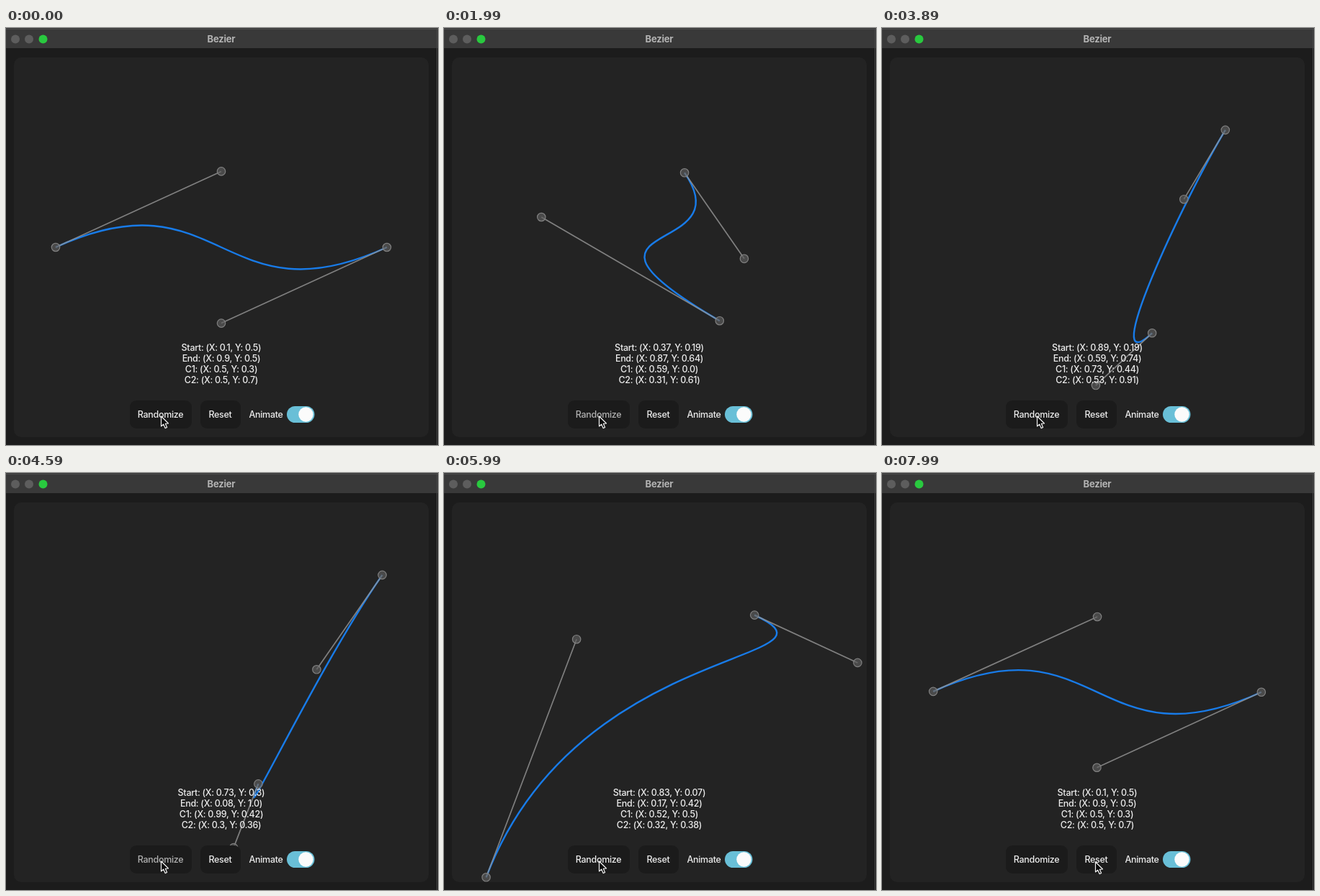
These frames come from a looping animation (600 px wide and 580 px high, 8090 ms). An HTML page with a canvas:

```html
<!DOCTYPE html>
<html lang="en">
<head>
<meta charset="utf-8">
<title>Bezier</title>
<style>
html, body { margin: 0; width: 100%; height: 100%; overflow: hidden; background: #1c1c1c; }
canvas { display: block; width: 600px; height: 580px; }
</style>
</head>
<body>
<canvas id="stage" width="600" height="580"></canvas>
<script>
const ctx = document.getElementById('stage').getContext('2d');
const LOOP = 8090, STEP = 100, MOVE = 800;
const FONT = 'Inter, "Open Sans", sans-serif';
const panel = { x: 11.5, y: 41, w: 575, h: 528 };

// Each pose: start, end, c1, c2 as x, y fractions of the panel.
const home = [0.1, 0.5, 0.9, 0.5, 0.5, 0.3, 0.5, 0.7];
const poses = [
  { at: -MOVE, p: home },
  { at: 650, p: [0.5625, 0.3045, 0.644, 0.694, 0.706, 0.534, 0.2145, 0.419] },
  { at: 1940, p: [0.367, 0.191, 0.868, 0.642, 0.594, 0.004, 0.31, 0.607] },
  { at: 3307, p: [0.889, 0.191, 0.59, 0.741, 0.73, 0.44, 0.53, 0.91] },
  { at: 4570, p: [0.7285, 0.3, 0.0805, 0.996, 0.986, 0.421, 0.3, 0.36] },
  { at: 5920, p: [0.829, 0.0745, 0.171, 0.419, 0.524, 0.498, 0.3157, 0.376] },
  { at: 7231, p: home, reset: true }
];

const clamp = v => Math.max(0, Math.min(1, v));
const lerp = (a, b, k) => a + (b - a) * k;

// Cubic ease-in-out with control points (0.42, 0) and (0.58, 1).
function ease(x) {
  x = clamp(x);
  if (x === 0 || x === 1) return x;
  let lo = 0, hi = 1, u = x;
  for (let i = 0; i < 24; i++) {
    u = (lo + hi) / 2;
    const bx = 1.26 * u * (1 - u) ** 2 + 1.74 * u * u * (1 - u) + u ** 3;
    if (bx < x) lo = u; else hi = u;
  }
  return u * u * (3 - 2 * u);
}

function box(x, y, w, h, r, fill) {
  ctx.beginPath();
  ctx.roundRect(x, y, w, h, r);
  ctx.fillStyle = fill;
  ctx.fill();
}

function dot(x, y, r, fill, stroke) {
  ctx.beginPath();
  ctx.arc(x, y, r, 0, Math.PI * 2);
  ctx.fillStyle = fill;
  ctx.fill();
  if (stroke) {
    ctx.strokeStyle = stroke;
    ctx.lineWidth = 1.2;
    ctx.stroke();
  }
}

function label(text, x, y, fill = '#ececec', font = '500 12.5px ', spacing = '-0.3px') {
  ctx.font = font + FONT;
  ctx.letterSpacing = spacing;
  ctx.textAlign = 'center';
  ctx.textBaseline = 'alphabetic';
  ctx.fillStyle = fill;
  ctx.fillText(text, x, y + 4.5);
}

function drawWindow() {
  ctx.fillStyle = '#1c1c1c';
  ctx.fillRect(0, 0, 600, 580);
  ctx.fillStyle = '#393939';
  ctx.fillRect(0, 0, 600, 28);
  ctx.fillStyle = '#4c4c4c';
  ctx.fillRect(0, 1, 600, 1);
  ctx.fillStyle = '#454545';
  ctx.fillRect(598, 2, 1, 578);
  dot(13, 15.5, 6, '#5d5d5d');
  dot(32, 15.5, 6, '#5d5d5d');
  dot(51.5, 15.5, 6, '#29c93f');
  label('Bezier', 299, 15, '#b4b4b4', '700 13px ', '-0.2px');
  box(11, 41, 576, 528, 10, '#232323');
}

function drawCurve(p) {
  const pts = [0, 2, 4, 6].map(i => [panel.x + panel.w * p[i], panel.y + panel.h * p[i + 1]]);
  const [start, end, c1, c2] = pts;
  ctx.save();
  ctx.beginPath();
  ctx.roundRect(11, 41, 576, 528, 10);
  ctx.clip();

  ctx.beginPath();
  ctx.moveTo(...start);
  ctx.bezierCurveTo(...c1, ...c2, ...end);
  ctx.strokeStyle = '#187be8';
  ctx.lineWidth = 2.4;
  ctx.stroke();

  ctx.beginPath();
  ctx.moveTo(...start);
  ctx.lineTo(...c1);
  ctx.moveTo(...end);
  ctx.lineTo(...c2);
  ctx.strokeStyle = 'rgba(150,150,150,.8)';
  ctx.lineWidth = 1.7;
  ctx.stroke();

  for (const [x, y] of pts) dot(x, y, 5.7, 'rgba(94,94,94,.66)', '#808080');
  ctx.restore();
}

function number(v) {
  const s = String(Math.round(v * 100) / 100);
  return s.includes('.') ? s : s + '.0';
}

function drawReadout(p) {
  ['Start', 'End', 'C1', 'C2'].forEach((name, i) => {
    const text = `${name}: (X: ${number(p[i * 2])}, Y: ${number(p[i * 2 + 1])})`;
    label(text, 299, 444 + i * 15.3);
  });
}

function drawControls(t) {
  const pressed = poses.find(q => t >= q.at - 130 && t < q.at + 60);
  const tone = on => on ? '#b0b0b0' : '#ececec';
  box(172, 518, 86, 39, 9, '#1b1b1b');
  box(270, 518, 56, 39, 9, '#1b1b1b');
  label('Randomize', 214.5, 537.5, tone(pressed && !pressed.reset));
  label('Reset', 297.5, 537.5, tone(pressed && pressed.reset));
  label('Animate', 361, 537.5);
  box(390, 526, 38.5, 23, 11.5, '#69bfd7');
  dot(416.5, 537.5, 10.2, '#fbfbfb');
}

function drawCursor(t) {
  const k = ease((t - 6130) / 450);
  const nudge = ease((t - 6800) / 250);
  ctx.save();
  ctx.translate(lerp(215.5, 294.5, k) + 2 * nudge, lerp(540, 541, k));
  ctx.beginPath();
  [[0, 0], [0, 14], [3.2, 11.2], [5.6, 16.6], [8.1, 15.5], [5.8, 10.3], [10, 10]]
    .forEach(([x, y]) => ctx.lineTo(x, y));
  ctx.closePath();
  ctx.fillStyle = '#0a0a0a';
  ctx.fill();
  ctx.strokeStyle = '#f2f2f2';
  ctx.lineWidth = 1.2;
  ctx.lineJoin = 'round';
  ctx.stroke();
  ctx.restore();
}

function draw(t) {
  let i = 0;
  while (i + 1 < poses.length && poses[i + 1].at <= t) i++;
  const to = poses[i], from = poses[Math.max(0, i - 1)];
  const k = ease((t - to.at) / MOVE);
  drawWindow();
  drawCurve(to.p.map((v, j) => lerp(from.p[j], v, k)));
  drawReadout(to.p);
  drawControls(t);
  drawCursor(t);
}

const began = performance.now();
function tick() {
  const t = (performance.now() - began) % LOOP;
  // The picture advances ten times a second.
  draw(Math.max(0, Math.floor((t - 90) / STEP) * STEP + 90));
  requestAnimationFrame(tick);
}
tick();
</script>
</body>
</html>
```
